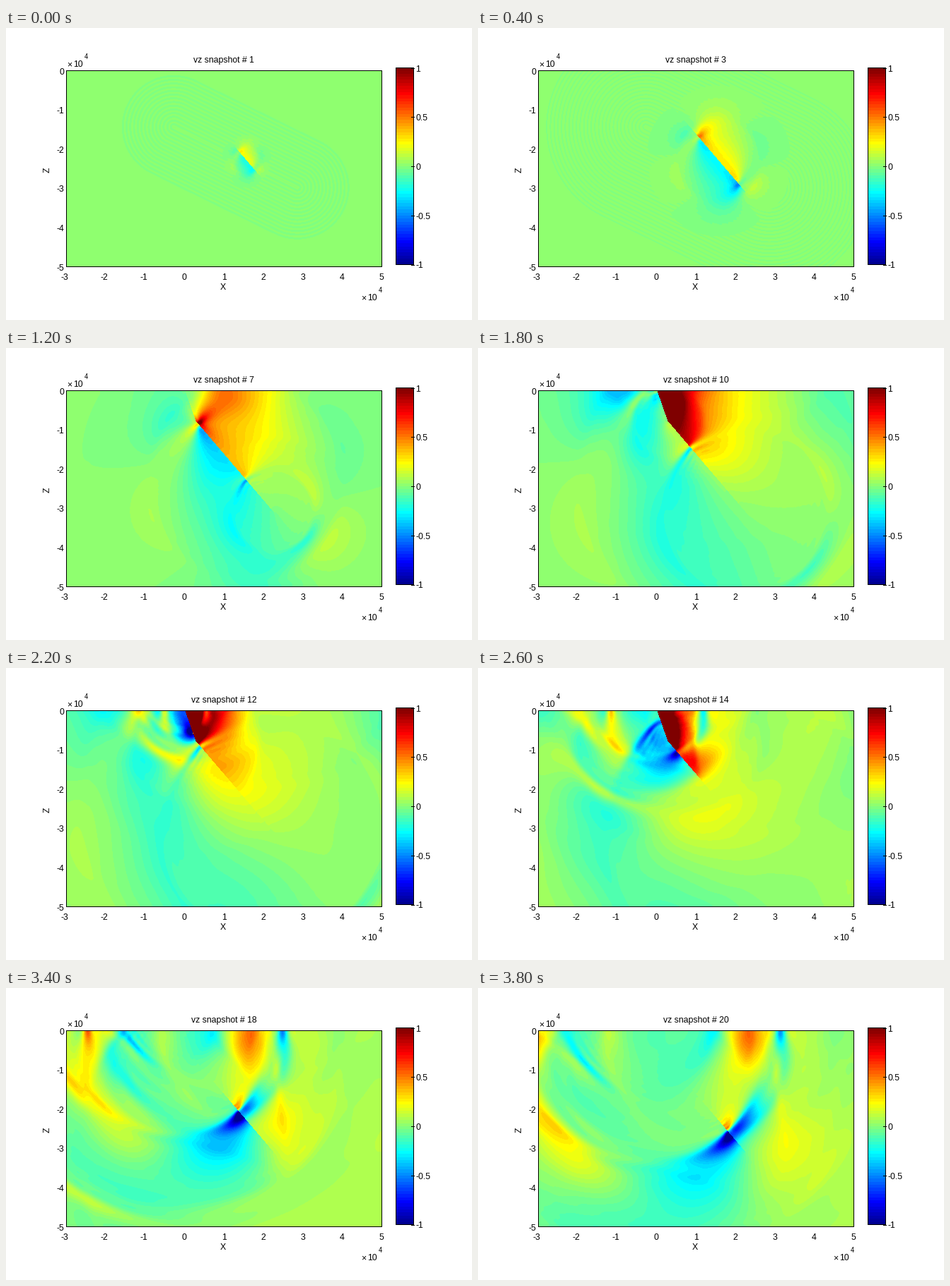
A matplotlib script for the animation above (4000 ms loop, 659x414 px).

```python
import numpy as np
import matplotlib.pyplot as plt
from matplotlib.animation import FuncAnimation
from matplotlib.colors import ListedColormap
from matplotlib.patches import Rectangle

W, H, DPI = 659, 414, 64
LEFT, TOP, RIGHT, BOTTOM = 85, 60, 531, 338
FRAMES, STEPS = 20, 32          # snapshots, time steps per snapshot
CELL, PAD = 2, 40               # grid spacing in pixels, sponge width in cells
NX, NZ = (RIGHT - LEFT) // CELL + 1, (BOTTOM - TOP) // CELL
SHAPE = (NZ + PAD, NX + 2 * PAD)
C = 10 / STEPS                  # shear speed in cells per step

# Fault trace from the surface over a bend to its lower end
FAULT = [(253, 60), (268, 103), (378, 232)]
FOCUS, END = 157, 215           # arc lengths of the focus and the lower end
STOP, BREAKOUT = 3.9, 10.5      # times when the rupture ends are reached
VS, VP, HEAL = 20, 34.6, 18.6   # speeds in pixels per snapshot


def ramp(x, width):
    return np.clip(x / width, 0, 1)


def slip_rate(s, t):
    """Slip rate at arc length s: growing crack, stopping phase, breakout."""
    half = 4 + 13.3 * t + .23 * t * t
    x = np.abs(s - FOCUS)
    v = (.65 + .03 * t) / np.sqrt(np.clip(1 - (x / half) ** 2, .08, 1))
    v *= ramp(half - x, 5)
    if t > STOP:
        inside = VS * (t - STOP) - (END - s)
        v *= np.where(inside > 0, .5 * np.exp(-np.maximum(inside, 0) / 40), 1)
    if t > BREAKOUT:
        front = HEAL * (t - BREAKOUT)
        v += 1.7 * (1 - s / END) * ramp(VP * (t - BREAKOUT) - s, 15)
        core = 2.6 * ramp(16 - t, 3)
        v += (core - v) * ramp(front - s, 8)
        v += 1.5 * np.exp(-np.abs(s - front) / 8)
    return v


def project(x, z, path):
    """Nearest point on a path: distance, foot, arc length and direction."""
    best = None
    start = 0
    for (x0, z0), (x1, z1) in zip(path, path[1:]):
        length = np.hypot(x1 - x0, z1 - z0)
        dx, dz = (x1 - x0) / length, (z1 - z0) / length
        u = np.clip((x - x0) * dx + (z - z0) * dz, 0, length)
        fx, fz = x0 + u * dx, z0 + u * dz
        new = [np.hypot(x - fx, z - fz), fx, fz, start + u,
               np.full_like(u, dx), np.full_like(u, dz)]
        if best is not None:
            near = new[0] < best[0]
            new = [np.where(near, n, b) for n, b in zip(new, best)]
        best = new
        start += length
    return best


def fault_cells(off):
    """Cells near the fault: index, arc length, normal and shear weights."""
    i, j = np.indices(SHAPE)
    d, _, _, arc, dx, dz = project(LEFT + CELL * (j + off - PAD),
                                   TOP + CELL * (i + off), FAULT)
    q = d / CELL
    weight = np.exp(-.5 * (q / .75) ** 2) / (.75 * np.sqrt(2 * np.pi))
    idx = np.flatnonzero(q < 3)
    pick = lambda m: m.ravel()[idx]
    return (idx, pick(arc), pick(weight * dx * dz),
            pick(weight * (dz * dz - dx * dx)))


def smooth(m):
    """Slight viscosity against grid ringing."""
    m[1:-1, 1:-1] += .005 * (m[2:, 1:-1] + m[:-2, 1:-1] + m[1:-1, 2:]
                             + m[1:-1, :-2] - 4 * m[1:-1, 1:-1])


def simulate():
    """Elastic waves on a staggered grid with a free surface on top."""
    vx, vz, sxx, szz, sxz = (np.zeros(SHAPE, np.float32) for _ in range(5))
    i, j = np.indices(SHAPE)
    edge = np.minimum(np.minimum(j, SHAPE[1] - 1 - j), SHAPE[0] - 1 - i)
    sponge = np.exp(-(.012 * np.clip(PAD - edge, 0, None)) ** 2)
    sponge = sponge.astype(np.float32)
    n_idx, n_arc, n_w, _ = fault_cells(0)
    s_idx, s_arc, _, s_w = fault_cells(.5)
    dx = lambda m: np.diff(m, axis=1)
    dz = lambda m: np.diff(m, axis=0)
    shots = []
    for step in range(1, FRAMES * STEPS + 1):
        vx[1:, :-1] += C * (dx(sxx[1:]) + dz(sxz)[:, :-1])
        vx[0, :-1] += C * (np.diff(sxx[0]) + 2 * sxz[0, :-1])
        vz[:-1, 1:] += C * (dx(sxz[:-1]) + dz(szz)[:, 1:])
        smooth(vx)
        smooth(vz)
        ex, ez = dx(vx), dz(vz)
        sxx[1:, 1:] += C * (3 * ex[1:] + ez[:, 1:])
        szz[1:, 1:] += C * (ex[1:] + 3 * ez[:, 1:])
        sxx[0, 1:] += C * 8 / 3 * ex[0]
        sxz[:-1, :-1] += C * (dz(vx)[:, :-1] + dx(vz)[:-1])

        t = step / STEPS
        slip = 2 * C * slip_rate(n_arc, t) * n_w
        sxx.flat[n_idx] -= slip
        szz.flat[n_idx] += slip
        sxz.flat[s_idx] -= C * slip_rate(s_arc, t) * s_w
        szz[0] = 0

        for m in (vx, vz, sxx, szz, sxz):
            m *= sponge
        if step % STEPS == 0:
            shots.append(vz[:NZ, PAD:PAD + NX].astype(float))
    return shots


def bilinear(f, col, row):
    col = np.clip(col, 0, f.shape[1] - 1.001)
    row = np.clip(row, 0, f.shape[0] - 1.001)
    j, i = col.astype(int), row.astype(int)
    u, v = col - j, row - i
    return ((f[i, j] * (1 - u) + f[i, j + 1] * u) * (1 - v)
            + (f[i + 1, j] * (1 - u) + f[i + 1, j + 1] * u) * v)


def render(shots):
    """Pixel images with a sharp fault and faint early ripples around it."""
    z, x = np.mgrid[TOP:BOTTOM + 1, LEFT:RIGHT + 1] + .25
    d, fx, fz = project(x, z, FAULT)[:3]
    push = np.maximum(d, 4) / np.maximum(d, .01)
    col = (fx + (x - fx) * push - LEFT) / CELL
    row = (fz + (z - fz) * push - TOP - 1) / CELL
    reach = project(x, z, [(237, 140), (412, 226)])[0]
    images = []
    for n, f in enumerate(shots):
        img = bilinear(f, col, row)
        img[np.abs(img) < .002] = .002
        wave = .006 * np.sin(1.2 * reach) - .003
        img += (reach < 75 + 34 * n) * np.exp(-n / 2) * wave
        images.append(img)
    return images


def jet64():
    k = np.arange(64)
    band = lambda lo, hi: np.clip(np.minimum(k - lo, hi - k) / 16, 0, 1)
    return ListedColormap(np.c_[band(23, 71), band(7, 55), band(-9, 39)])


snapshots = render(simulate())
cmap = jet64()

fig = plt.figure(figsize=(W / DPI, H / DPI), dpi=DPI, facecolor="white")
ax = fig.add_axes([0, 0, 1, 1])
PX = 72 / DPI


def label(x, y, s, ha="center", size=12.3, **kw):
    return ax.text(x, y, s, ha=ha, va=kw.pop("va", "baseline"),
                   fontsize=size * PX, family="Liberation Sans",
                   color="black", **kw)


def frame_box(x0, y0, x1, y1):
    ax.add_patch(Rectangle((x0 + .5, y0 + .5), x1 - x0, y1 - y0, fill=False,
                           ec="black", lw=PX, snap=False, zorder=3))


def power(x, y):
    label(x, y, "×", "left", 12.3)
    label(x + 9, y, "10", "left")
    label(x + 25, y - 11, "4", "left", 9.5)


def show(data, x0, y0, x1, y1):
    return ax.imshow(data, cmap=cmap, vmin=-1, vmax=1, aspect="auto",
                     interpolation="nearest", extent=(x0, x1, y1, y0))


image = show(snapshots[0], LEFT, TOP, RIGHT + 1, BOTTOM + 1)
frame_box(LEFT, TOP, RIGHT, BOTTOM)
show(np.linspace(1, -1, 64)[:, None], 551, 56, 577, 336)
frame_box(551, 56, 576, 335)

for k in range(5):
    y = 56.5 + 69.75 * k
    ax.plot([573, 577], [y, y], color="black", lw=PX, zorder=3)
    label(579, y + 5, f"{1 - k / 2:g}", "left")
for v in range(-3, 6):
    label(LEFT + (v + 3) * 55.75 - (2 if v < 0 else 0), 357, str(v))
for v in range(6):
    label(82, TOP + v * 55.6 + 5.5, str(-v), "right")
label(307, 371, "X")
label(59, 201, "Z", va="center", rotation=90)
power(86, 55)
power(502, 386)
title = label(308, 49, "")

ax.set_xlim(0, W)
ax.set_ylim(H, 0)
ax.axis("off")


def draw(i):
    image.set_data(snapshots[i])
    title.set_text(f"vz snapshot # {i + 1}")
    return image, title


anim = FuncAnimation(fig, draw, frames=FRAMES, interval=200, repeat=True)
plt.show()
```
